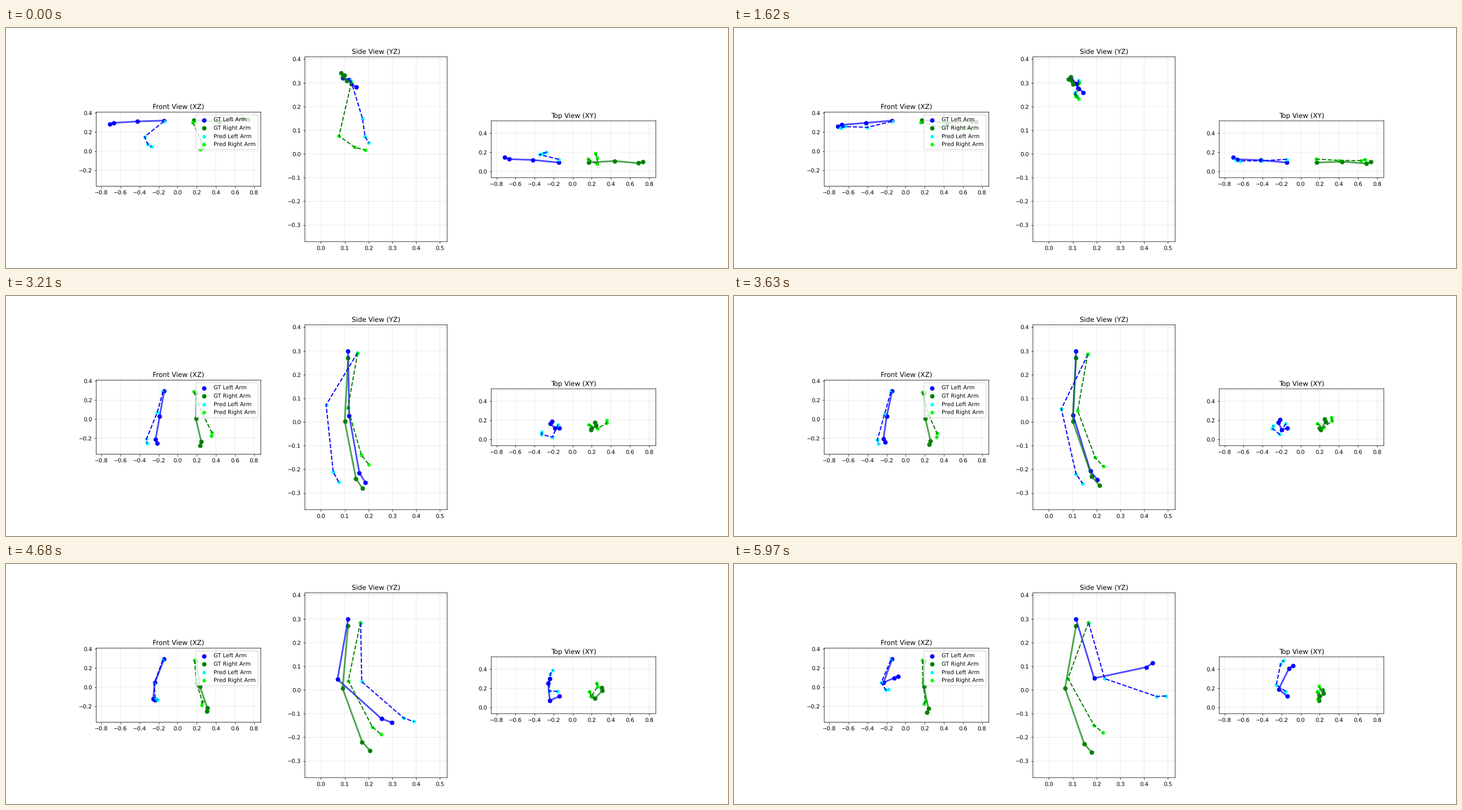
Animation, 1280 px wide and 427 px high, one loop 6 s. Source, as a matplotlib script:

```python
import numpy as np
import matplotlib.pyplot as plt
from matplotlib.animation import FuncAnimation
from matplotlib.ticker import MultipleLocator

# Soft edges: lines and glyphs keep their fractional pixel positions.
plt.rcParams.update({"font.family": "DejaVu Sans", "path.snap": False,
                     "text.hinting": "none"})

DPI = 640 / 9
FRAMES, INTERVAL = 200, 30
X_LIM, Y_LIM, Z_LIM = (-0.855, 0.872), (-0.0676, 0.5306), (-0.37, 0.41)
LEFT, RIGHT = -1, 1
HAND = 0.05
FALL_START = 1900


def smoothstep(u):
    u = np.clip(u, 0, 1)
    return u * u * (3 - 2 * u)


def direction(out, flex):
    """Unit vector (outward, forward, up) of a bone; zero angles hang down."""
    out, flex = np.radians([out, flex])
    return np.array([np.sin(out), np.cos(out) * np.sin(flex), -np.cos(out) * np.cos(flex)])


def tangents(times, values):
    """Slopes for a smooth path that stays flat at holds and extremes."""
    rate = np.diff(values, axis=0) / np.diff(times)[:, None]
    before, after = rate[:-1], rate[1:]
    same = before * after > 0
    inner = np.where(same, 2 * before * after / np.where(same, before + after, 1), 0)
    return np.vstack([rate[:1], inner, rate[-1:]])


class Arm:
    """A jointed arm: shoulder that settles, upper arm, forearm and hand.

    Keys map a time in ms to (upper out, upper flex, fore out, fore flex)
    in degrees, with an optional factor on the forearm's length.
    """

    def __init__(self, side, upper, fore, shoulder, settled, settle_time, keys):
        self.side, self.upper, self.fore = side, upper, fore
        self.shoulder, self.settled = np.array(shoulder), np.array(settled)
        self.settle_time = settle_time
        self.times = np.array(list(keys), float)
        self.values = np.array([(*key, 1)[:5] for key in keys.values()], float)
        self.slopes = tangents(self.times, self.values)

    def angles(self, t):
        t = np.clip(t, self.times[0], self.times[-1])
        i = min(np.searchsorted(self.times, t, side="right"), len(self.times) - 1) - 1
        span = self.times[i + 1] - self.times[i]
        u = (t - self.times[i]) / span
        start, end = self.values[i:i + 2]
        leave, arrive = self.slopes[i:i + 2] * span
        return (start + (end - start) * smoothstep(u)
                + leave * u * (1 - u) ** 2 - arrive * u * u * (1 - u))

    def joints(self, t):
        upper_out, upper_flex, fore_out, fore_flex, stretch = self.angles(t)
        settle = smoothstep((t - FALL_START) / (self.settle_time - FALL_START))
        points = np.cumsum([
            self.shoulder + (self.settled - self.shoulder) * settle,
            self.upper * direction(upper_out, upper_flex),
            self.fore * stretch * direction(fore_out, fore_flex),
            HAND * direction(fore_out - 27, fore_flex + 22),
        ], axis=0)
        return points * (self.side, 1, 1)


true_left = Arm(
    LEFT, 0.275, 0.25, (0.147, 0.091, 0.321), (0.142, 0.114, 0.298), 2700,
    {1260: (84, 73, 86, 30), 1750: (82, 38, 84, 22), 2460: (43, 6, 47, 5),
     3210: (10, 1, 10, 10), 4680: (21, -10, 4, 48), 5970: (19, 17, -26, 102)})

true_right = Arm(
    RIGHT, 0.268, 0.253, (0.170, 0.091, 0.325), (0.195, 0.114, 0.271), 2700,
    {1260: (85, 45, 99, 35), 1750: (82, 11, 95, 43), 2460: (34, -3, 49, 10),
     3210: (-1, -3, 13, 11), 4080: (7, -3, 12, 27), 4680: (8, -5, 18, 20),
     5970: (-1, -10, 11, 19)})

LEVEL = (76, -14, 92, 15)

pred_left = Arm(
    LEFT, 0.263, 0.235, (0.147, 0.125, 0.312), (0.158, 0.167, 0.282), 4000,
    {0: (50, 17, -24, 8, 0.36), 600: LEVEL, FALL_START: LEVEL,
     2460: (39, 7, 30, 57, 0.67), 3210: (13, -31, 22, 6, 1.3),
     4680: (20, 1, -3, 49), 5970: (22, 16, -11, 71)})

pred_right = Arm(
    RIGHT, 0.252, 0.228, (0.160, 0.128, 0.302), (0.175, 0.166, 0.285), 4000,
    {0: (23, -13, 0, 54, 0.36), 600: LEVEL, FALL_START: LEVEL,
     2460: (17, -17, 32, 21), 3210: (21, -10, 25, 16),
     4080: (8, -10, 20, 26), 5970: (1, -20, 7, 29)})

TRUE_LINE = dict(lw=3, alpha=0.7)
PRED_LINE = dict(lw=2, ls="--")
# arm, label, dot colour, dot size, line colour, line style
ARMS = [
    (true_left, "GT Left Arm", "blue", 50, "blue", TRUE_LINE),
    (true_right, "GT Right Arm", "green", 50, "green", TRUE_LINE),
    (pred_left, "Pred Left Arm", "cyan", 30, "blue", PRED_LINE),
    (pred_right, "Pred Right Arm", "lime", 30, "green", PRED_LINE),
]
# title, horizontal axis, vertical axis, limits, tick step
VIEWS = [
    ("Front View (XZ)", 0, 2, X_LIM, Z_LIM, 0.2),
    ("Side View (YZ)", 1, 2, Y_LIM, Z_LIM, 0.1),
    ("Top View (XY)", 0, 1, X_LIM, Y_LIM, 0.2),
]

fig, axes = plt.subplots(1, 3, figsize=((1280 + 1e-6) / DPI, (427 + 1e-6) / DPI), dpi=DPI)
parts = []
for ax, (title, h, v, h_lim, v_lim, step) in zip(axes, VIEWS):
    ax.set(title=title, xlim=h_lim, ylim=v_lim)
    ax.set_aspect("equal")
    ax.xaxis.set_major_locator(MultipleLocator(step))
    ax.yaxis.set_major_locator(MultipleLocator(step))
    ax.grid(alpha=0.3)
    for arm, label, dot_color, size, line_color, style in ARMS:
        dots = ax.scatter([], [], s=size, c=dot_color, label=label)
        line, = ax.plot([], [], color=line_color, **style)
        parts.append((arm, [h, v], dots, line))
axes[0].legend(loc="upper right")


def update(frame):
    joints = {arm: arm.joints(frame * INTERVAL) for arm, *_ in ARMS}
    for arm, plane, dots, line in parts:
        points = joints[arm][:, plane]
        dots.set_offsets(points)
        line.set_data(*points.T)
    return []


animation = FuncAnimation(fig, update, frames=FRAMES, interval=INTERVAL, repeat=True)
plt.show()
```
